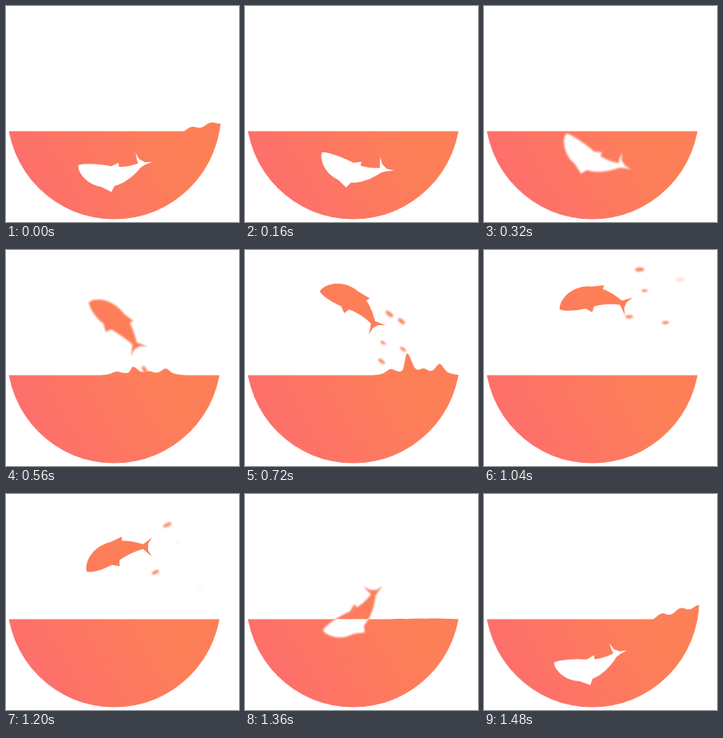
Write an HTML page that moves like this. It is 292 by 270 pixels and loops after 1520 ms.

```html
<!DOCTYPE html>
<html lang="en">
<head>
<meta charset="utf-8">
<title>Leaping whale</title>
<style>
html, body { margin: 0; width: 100%; height: 100%; overflow: hidden; background: #fff; }
svg { display: block; width: 292px; height: 270px; }
</style>
</head>
<body>
<svg viewBox="0 0 292 270">
  <defs>
    <linearGradient id="coral" gradientUnits="userSpaceOnUse" x1="20" y1="245" x2="215" y2="135">
      <stop offset="0" stop-color="#fe6d6e"/>
      <stop offset=".85" stop-color="#fd7f58"/>
    </linearGradient>
    <clipPath id="globe"><circle cx="135.6" cy="132.4" r="134.2"/></clipPath>
    <clipPath id="air"><rect width="292" height="156.5"/></clipPath>
    <clipPath id="sea"><rect y="156.5" width="292" height="114"/></clipPath>
    <filter id="soft" filterUnits="userSpaceOnUse" width="292" height="270">
      <feGaussianBlur id="blur" stdDeviation="0"/>
    </filter>
    <filter id="haze" filterUnits="userSpaceOnUse" width="292" height="270">
      <feGaussianBlur stdDeviation="1"/>
    </filter>
  </defs>
  <g clip-path="url(#globe)"><path id="water" fill="url(#coral)"/></g>
  <g clip-path="url(#air)">
    <path id="above" fill="url(#coral)" filter="url(#soft)"/>
    <g id="drops" fill="#fd7f58" filter="url(#haze)"></g>
  </g>
  <g clip-path="url(#sea)"><path id="below" fill="#fff" filter="url(#soft)"/></g>
</svg>
<script>
const LOOP = 1520, STEP = 40, LEVEL = 156.5;
const { PI, sin, cos, exp, abs, max, min, tanh } = Math;
const $ = id => document.getElementById(id);
const clamp = v => max(0, min(1, v));
const path = pts => "M" + pts.map(p => p.map(v => v.toFixed(2)).join(" ")).join("L") + "Z";

// time, centre x y, pitch in degrees
const keys = [
  [0, 129, 199, 0],
  [320, 136, 179.5, 31],
  [560, 132.5, 91, 42],
  [720, 127, 71, 30],
  [880, 128.5, 69, 12],
  [1200, 136.5, 81.5, -24],
  [1340, 130, 139, -37],
  [1480, 126, 206, -7]
];

// smooth cyclic curve through the keys
function pose(t) {
  const n = keys.length;
  const key = i => {
    const [time, ...v] = keys[(i + n) % n];
    return { time: time + LOOP * Math.floor(i / n), v };
  };
  let i = n - 1;
  while (keys[i][0] > t) i--;
  const [a, b, c, d] = [-1, 0, 1, 2].map(k => key(i + k));
  const span = c.time - b.time, u = (t - b.time) / span;
  const slope = (p, q, j) => (q.v[j] - p.v[j]) / (q.time - p.time) * span;
  return b.v.map((v, j) => {
    const m0 = slope(a, c, j), m1 = slope(b, d, j), e = c.v[j] - v;
    return v + u * (m0 + u * (3 * e - 2 * m0 - m1 + u * (m0 + m1 - 2 * e)));
  });
}

const girth = s => 12.5 * sin(PI * s ** .7) + 3 * s;

// one flank of the body, its edge broken by a fin between two places
function flank(sign, from, to, tip) {
  const pts = [];
  for (let i = 0; i <= 40; i++) {
    const s = i / 40;
    if (s <= from || s >= to) pts.push([s, sign * girth(s)]);
    else if (pts[pts.length - 1] !== tip) pts.push(tip);
  }
  return pts;
}

const fluke = [[1.05, 6], [1.14, 12], [1.08, 4]];
const outline = [
  ...flank(1, .57, .68, [.715, 15]),
  ...fluke,
  ...fluke.map(([s, off]) => [s, -off]).reverse(),
  ...flank(-1, .4, .56, [.53, -19.5]).reverse()
];

// the spine arches in the air and sags under water
function whale([x, y, pitch]) {
  const half = 38.5, a = pitch * PI / 180;
  const bend = 14 * tanh((105 - y) / 30);
  const twist = .032 * min(0, bend);
  return path(outline.map(([s, off]) => {
    const k = min(s, 1), extra = (s - k) * 80;
    const along = (2 * k - 1) * half, lift = 4 * k * (1 - k) * bend;
    const dir = a + Math.atan2(-2 * bend * (1 - 2 * k), half) + (s > 1 ? twist : 0);
    return [
      x + along * cos(a) + lift * sin(a) + extra * cos(dir) + off * sin(dir),
      y + along * sin(a) - lift * cos(a) + extra * sin(dir) - off * cos(dir)
    ];
  }));
}

const bell = z => exp(-z * z / 2);

// crown thrown up by the leap: a low swell, small crests and one spike
function leapWave(x, t) {
  const rise = sin(PI * clamp((t - 440) / 600));
  const mid = 203 + .275 * (t - 720);
  let h = 4.5 * exp(-(((x - mid - 13) / 44) ** 6));
  for (const i of [-1, 1, 2]) h += (2 + 2 * i * i) * bell((x - mid - 20.5 * i) / 4.5);
  const z = x - mid;
  return rise * h + 23 * rise * rise * bell(z / (z < 0 ? 2.5 : 5.5));
}

// rippled ramp pushed out by the dive
function diveWave(x, t) {
  const late = t < 600 ? t + LOOP : t;
  const size = sin(PI * clamp((late - 1300) / 360)) ** 4;
  const d = x - 206 - .26 * (late - 1480);
  if (d < 0) return 0;
  return size * max(0, .29 * d + 2.3 * cos(PI * (d - 16) / 12)) * exp(-((d / 80) ** 8));
}

function water(t) {
  const pts = [[0, 270]];
  for (let x = 0; x <= 292; x++) pts.push([x, LEVEL - leapWave(x, t) - diveWave(x, t)]);
  return path([...pts, [292, 270]]);
}

// drops in free flight: place at 720 ms and velocity per ms
const GRAVITY = .00055;
const drops = [
  [181, 80, .044, -.35],
  [196, 89, .156, -.338],
  [171, 139, .034, -.35],
  [198, 124, .092, -.28],
  [173, 116, .088, -.38]
].map(flight => ({
  flight,
  el: $("drops").appendChild(document.createElementNS("http://www.w3.org/2000/svg", "ellipse"))
}));

function drawDrops(t) {
  const u = t - 720, tilt = 38 - .13 * u;
  drops.forEach(({ flight: [x0, y0, vx, vy], el }, i) => {
    const x = x0 + vx * u, y = y0 + vy * u + GRAVITY * u * u;
    const r = 5.8 - .5 * i;
    el.setAttribute("rx", r);
    el.setAttribute("ry", r * .45);
    el.setAttribute("transform", `translate(${x.toFixed(2)} ${y.toFixed(2)}) rotate(${tilt.toFixed(1)})`);
    el.setAttribute("opacity", .9 * clamp((1400 - 2100 * vx - t) / 120));
  });
}

function draw(t) {
  const now = pose(t), d = whale(now);
  const speed = abs(pose((t + 20) % LOOP)[1] - now[1]) / 20;
  $("above").setAttribute("d", d);
  $("below").setAttribute("d", d);
  $("blur").setAttribute("stdDeviation", (.3 + 2.2 * min(speed, .4)).toFixed(2));
  $("water").setAttribute("d", water(t));
  drawDrops(t);
}

const start = performance.now();
function tick() {
  const t = max(0, performance.now() - start) % LOOP;
  draw(Math.floor(t / STEP) * STEP);
  requestAnimationFrame(tick);
}
tick();
</script>
</body>
</html>
```
